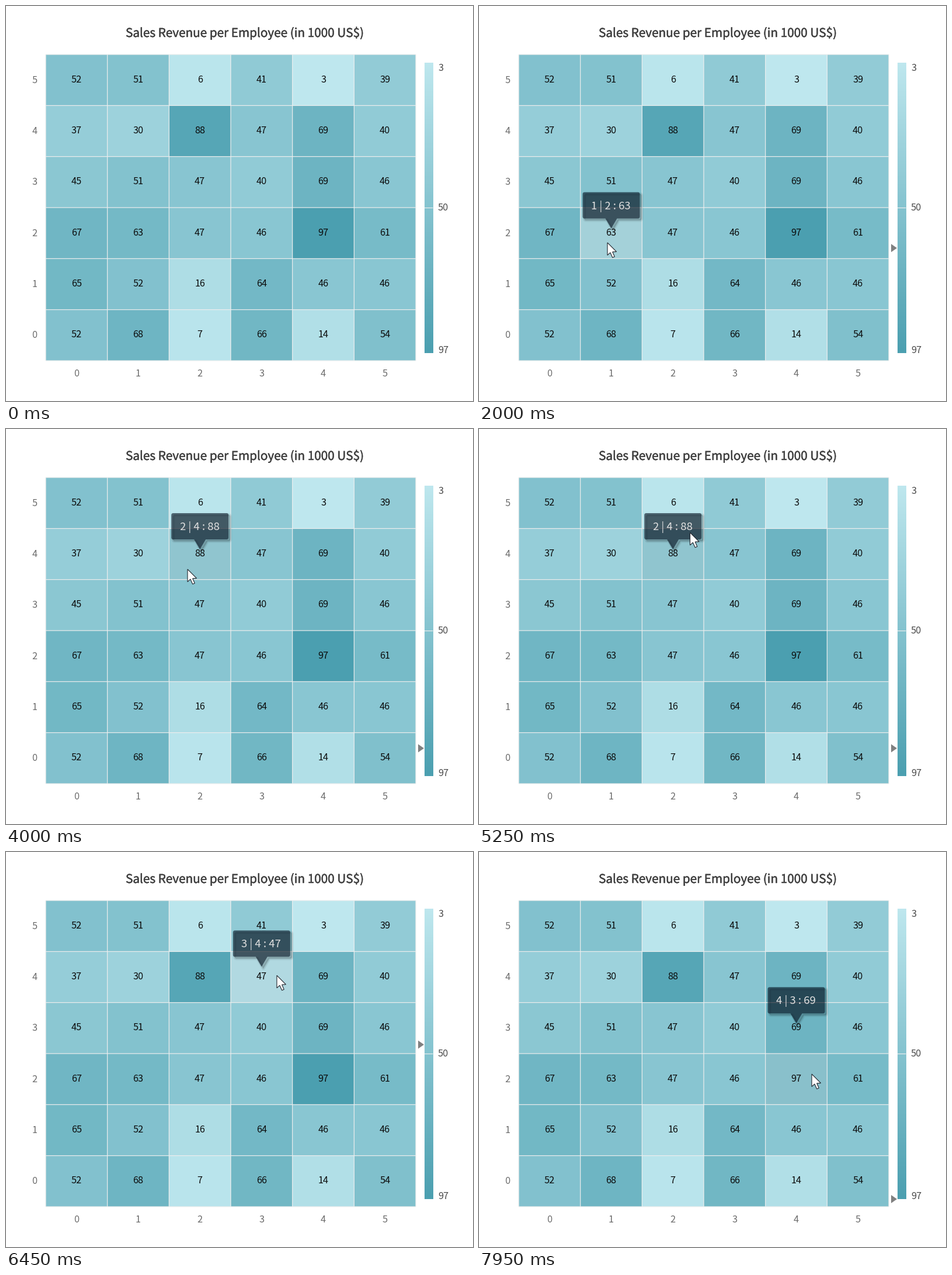
Recreate the animation shown at these times as a matplotlib script. Size 800 by 676 pixels, loop 8 s.

```python
import matplotlib.pyplot as plt
import numpy as np
from matplotlib import patheffects
from matplotlib.animation import FuncAnimation
from matplotlib.colors import LinearSegmentedColormap
from matplotlib.patches import Polygon, Rectangle
from matplotlib.transforms import Affine2D

W, H, DPI = 800, 676, 100
STEP, FRAMES = 50, 160
PX = 72 / DPI
LEFT, RIGHT, TOP, BOTTOM = 68, 702, 83, 607
N = 6
CW, CH = (RIGHT - LEFT) / N, (BOTTOM - TOP) / N
BAR_TOP, BAR_BOTTOM = 97, 594
LOW, HIGH = 3, 97
DELAY, SLIDE = 50, 150
LABEL = 16.3

# revenue by row, from the bottom up
DATA = np.array([
    [52, 68, 7, 66, 14, 54],
    [65, 52, 16, 64, 46, 46],
    [67, 63, 47, 46, 97, 61],
    [45, 51, 47, 40, 69, 46],
    [37, 30, 88, 47, 69, 40],
    [52, 51, 6, 41, 3, 39],
])

# mouse moves: begin, end, goal, easing power
ENTRY = (140, 672)
MOVES = [
    (50, 850, (160, 540), 0.6),
    (1450, 1950, (220, 405), 0.5),
    (2300, 3900, (311, 240), 0.75),
    (4950, 5750, (402, 127), 0.6),
    (5750, 6850, (555, 335), 2),
    (7500, 7950, (570, 380), 7),
]

cmap = LinearSegmentedColormap.from_list("teal", ["#BEE7EE", "#4B9FB0"])
plt.rcParams["font.family"] = ["Noto Sans CJK JP", "DejaVu Sans"]

fig = plt.figure(figsize=(W / DPI, H / DPI), dpi=DPI, facecolor="white")
ax = fig.add_axes([0, 0, 1, 1])


def label(x, y, text, size, color, ha="center", **kw):
    return ax.text(x, y, text, fontsize=size * PX, color=color, ha=ha,
                   va="baseline", **kw)


def center(col, row):
    return LEFT + (col + 0.5) * CW, BOTTOM - (row + 0.5) * CH


def bar_y(value):
    return BAR_TOP + (value - LOW) / (HIGH - LOW) * (BAR_BOTTOM - BAR_TOP)


def draw_chart():
    xs = np.linspace(LEFT, RIGHT, N + 1)
    ys = np.linspace(BOTTOM, TOP, N + 1)
    line = dict(color="#EEEEEE", lw=1.2 * PX, zorder=3, snap=False)
    ax.pcolormesh(xs, ys, DATA, cmap=cmap, vmin=LOW, vmax=HIGH, zorder=1)
    ax.hlines(ys, LEFT, RIGHT, **line)
    ax.vlines(xs, TOP, BOTTOM, **line)
    for (row, col), value in np.ndenumerate(DATA):
        x, y = center(col, row)
        label(x, y + 4, str(value), LABEL, "#0b0b0b", zorder=4)
    for i in range(N):
        x, y = center(i, i)
        label(x, 634, str(i), LABEL, "#6b6b6b")
        label(49, y + 5, str(i), LABEL, "#6b6b6b")

    ax.imshow(np.linspace(0, 1, 256)[:, None], cmap=cmap, aspect="auto",
              extent=(717, 731.5, BAR_BOTTOM, BAR_TOP), zorder=1)
    ax.hlines(bar_y(50), 717, 731.5, **line)
    for value, y in ((3, 111), (50, 350), (97, 594)):
        label(740, y, str(value), LABEL, "#4a4a4a", ha="left")

    title = label(409, 53, "Sales Revenue per Employee (in 1000 US$)", 20.7,
                  "#404040", zorder=4)
    title.set_path_effects([
        patheffects.Stroke(linewidth=0.45 * PX, foreground="#404040"),
        patheffects.Normal()])


def bubble_outline(half=49, top=-70, bottom=-25, radius=3):
    """Rounded box with a tail, relative to the cell center."""
    points = [(10, bottom), (0, -8), (-10, bottom)]
    corners = [(-1, bottom - radius), (-1, top + radius),
               (1, top + radius), (1, bottom - radius)]
    for i, (side, y) in enumerate(corners):
        for a in np.radians(90 + 90 * i + np.linspace(0, 90, 6)):
            points.append((side * (half - radius) + radius * np.cos(a),
                           y + radius * np.sin(a)))
    return points


def mouse_at(t):
    pos = np.array(ENTRY, float)
    for begin, end, goal, power in MOVES:
        u = np.clip((t - begin) / (end - begin), 0, 1)
        pos += (np.array(goal) - pos) * u ** power
    return pos


def cell_at(x, y):
    if LEFT <= x < RIGHT and TOP < y < BOTTOM:
        return int((x - LEFT) // CW), int((BOTTOM - y) // CH)
    return None


def build_states():
    """For each frame: mouse, hovered cell, tooltip cell, place and opacity."""
    states = []
    cell = shown = pos = start = None
    since, opacity = 0, 0
    for t in np.arange(FRAMES) * STEP:
        mouse = mouse_at(t)
        hover = cell_at(*mouse)
        if hover != cell:
            cell, since, start = hover, t, pos
        if cell:
            goal = np.array(center(*cell))
            p = np.clip((t - since - DELAY) / SLIDE, 0, 1)
            if pos is None:
                pos = start = goal
            opacity = max(opacity, p)
            if p > 0:
                pos, shown = start + (goal - start) * p * (2 - p), cell
        states.append((mouse, cell, shown, pos, opacity))
    return states


draw_chart()

glow = Rectangle((0, 0), CW, CH, fc="white", alpha=0.35, lw=0, zorder=2)
pointer = Polygon([(706, -7), (716, 0), (706, 7)], fc="#808080", lw=0, zorder=5)
outline = bubble_outline()
shadows = [Polygon(outline, fc="black", ec="black", lw=w * PX, zorder=6,
                   joinstyle="round") for w in (0, 2, 4, 6)]
bubble = Polygon(outline, fc="#000C1C", lw=0, zorder=7)
tip_text = label(0, 0, "", 18.5, "#E0E0E0", zorder=8)
arrow = Polygon([(0, 0), (0, 21.5), (4.9, 17), (8.7, 25.5), (12.3, 24),
                 (8.7, 15.8), (15.5, 15.5)], fc="white", ec="#20242c",
                lw=1.1 * PX, zorder=9)
for patch in (glow, pointer, *shadows, bubble, arrow):
    ax.add_patch(patch)

ax.set_xlim(0, W)
ax.set_ylim(H, 0)
ax.axis("off")

STATES = build_states()


def place(artist, x, y):
    artist.set_transform(Affine2D().translate(x, y) + ax.transData)


def update(n):
    mouse, cell, shown, pos, opacity = STATES[n]
    arrow.set_visible(n > 0)
    place(arrow, *mouse)

    glow.set_visible(cell is not None)
    pointer.set_visible(cell is not None)
    if cell:
        col, row = cell
        glow.set_xy((LEFT + col * CW, BOTTOM - (row + 1) * CH))
        place(pointer, 0, bar_y(DATA[row, col]))

    for artist in (*shadows, bubble, tip_text):
        artist.set_visible(opacity > 0)
    if opacity > 0:
        x, y = pos
        for shadow in shadows:
            place(shadow, x + 3, y + 3)
            shadow.set_alpha(0.045 * opacity)
        place(bubble, x, y)
        bubble.set_alpha(0.57 * opacity)
        col, row = shown
        tip_text.set_text(f"{col} | {row} : {DATA[row, col]}")
        tip_text.set_position((x - 0.5, y - 41))
        tip_text.set_alpha(opacity)
    return []


anim = FuncAnimation(fig, update, frames=FRAMES, interval=STEP, repeat=True,
                     repeat_delay=0, blit=False)
plt.show()
```
